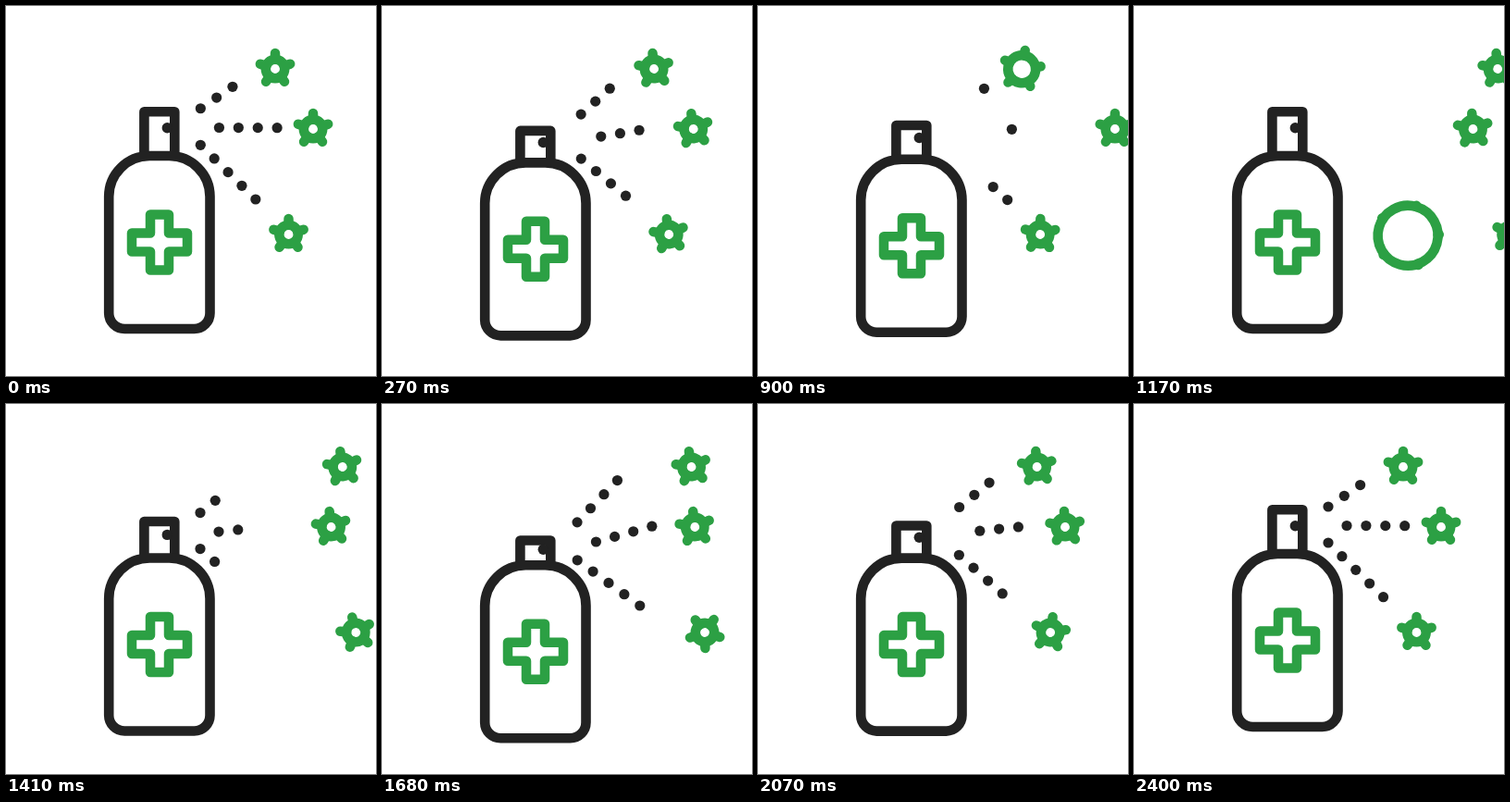
Animation, 400 px wide and 400 px high, one loop 2.43 s. Source, as an HTML page:

```html
<!DOCTYPE html>
<html lang="en">
<head>
<meta charset="utf-8">
<title>Disinfectant spray</title>
<style>
html, body { margin: 0; width: 100%; height: 100%; overflow: hidden; background: #fff; }
svg { display: block; width: 100vw; height: 100vh; }
.ink, .green { fill: none; stroke-linejoin: round; stroke-linecap: round; }
.ink { stroke: #222; stroke-width: 10.6; }
.green { stroke: #2ca044; stroke-width: 10.5; }
.dot { fill: #222; }
</style>
</head>
<body>
<svg viewBox="0 0 400 400">
  <path id="cap" class="ink"/>
  <circle id="nozzle" class="dot" cx="174.3" r="5.7"/>
  <g id="body">
    <path class="ink" d="M111.2 206A44 44 0 0 1 155.2 162H176.5A44 44 0 0 1 220.5 206V332A17 17 0 0 1 203.5 349H128.2A17 17 0 0 1 111.2 332Z"/>
    <path class="green" d="M156 225.5h20v20h20v20h-20v20h-20v-20h-20v-20h20z"/>
  </g>
  <g id="spray"></g>
  <g id="germs"></g>
</svg>
<script>
const LOOP = 2430, PRESS = 1215, GAP = 20.9, SIZE = 10.2, BURST = 240;
const $ = id => document.getElementById(id);
const make = (tag, parent, attrs) => {
  const el = document.createElementNS('http://www.w3.org/2000/svg', tag);
  for (const k in attrs) el.setAttribute(k, attrs[k]);
  return parent.appendChild(el);
};
const show = (el, on) => { el.style.display = on ? '' : 'none'; };
const span = (t, from, to) => Math.min(1, Math.max(0, (t - from) / (to - from)));
const smooth = u => u * u * (3 - 2 * u);

// Bottle press: the body sinks, the cap is squeezed into it, both come back.
const sink = p => 12.3 * smooth(span(p, 0, 480)) * (1 - span(p, 500, 1170)) ** 1.3;
const squeeze = p => 21 * smooth(span(p, 0, 460)) * (1 - span(p, 560, 1170) ** 1.27);

// Spray: the first puff is cut off from its start, the second grows to full length.
const jets = [
  [210, 111, 259, 77.8],
  [230, 131.5, 293.5, 131.7],
  [210, 150, 279.5, 218.5]
].map(line => ({
  line,
  dots: Array.from({ length: 6 }, () => make('circle', $('spray'), { class: 'dot', r: 5.6 }))
}));

function drawJet({ line: [x0, y0, x1, y1], dots }, t, low) {
  const y = y0 + 1.46 * low, len = Math.hypot(x1 - x0, y1 - y);
  const fading = t < 1200;
  const first = fading
    ? 0.419 * Math.sqrt(t) + len * span(t, 600, 1200)
    : GAP * span(t, 1500, 2400) ** 1.65 % GAP;
  const end = fading ? len : len * span(t, 1250, 1620);
  dots.forEach((dot, i) => {
    const d = first + i * GAP, u = d / len;
    dot.setAttribute('cx', x0 + (x1 - x0) * u);
    dot.setAttribute('cy', y + (y1 - y) * u);
    show(dot, d < end);
  });
}

// Each germ is pushed by the spray and bursts; a fresh one slows down into its place.
function germShape() {
  const g = make('g', $('germs'), {});
  return { g, ring: make('circle', g, { class: 'green' }), arms: make('path', g, { class: 'green' }) };
}
const germs = [
  { x: 291, y: 68, burst: 860, push: 0.019, rest: 2300, speed: 86, roll: 0, sway: 9 },
  { x: 332, y: 133, burst: 530, push: 0.025, rest: 1900, speed: 54, roll: 0, sway: 7 },
  { x: 305.5, y: 247, burst: 980, push: 0.025, rest: 2300, speed: 86, roll: 0.8, sway: 0 }
].map(g => ({ ...g, old: germShape(), fresh: germShape() }));

function drawShape({ g, ring, arms }, x, y, turn, r) {
  const tip = 17 + 0.75 * (r - SIZE);
  let d = '';
  for (let i = 0; i < 5; i++) {
    const a = i * Math.PI * 0.4, s = Math.sin(a), c = -Math.cos(a);
    d += `M${r * s} ${r * c}L${tip * s} ${tip * c}`;
  }
  g.setAttribute('transform', `translate(${x} ${y}) rotate(${turn})`);
  ring.setAttribute('r', r);
  arms.setAttribute('d', d);
}

function drawGerm(g, t) {
  const q = span(t, g.burst, g.burst + BURST);
  const drift = g.push * t - 2.82e-5 * t * t;
  drawShape(g.old, g.x + drift, g.y + 1.5 * q, -1.7 * drift, SIZE + 28 * q);
  show(g.old.g, q < 1);

  const away = g.speed * (Math.max(0, g.rest - t) / 1000) ** 1.42;
  const sway = g.sway * Math.sin(Math.PI * span(t, 900, 2300));
  drawShape(g.fresh, g.x + away, g.y, g.roll * away - sway, SIZE);
}

function draw(t) {
  const p = t % PRESS, low = sink(p);
  const base = 162 + low, top = 114.3 + low + squeeze(p);
  $('body').setAttribute('transform', `translate(0 ${low})`);
  $('cap').setAttribute('d', `M149.4 ${base}V${top}H182.3V${base}`);
  $('nozzle').setAttribute('cy', base - (base - top) * 0.635);
  jets.forEach(j => drawJet(j, t, low));
  germs.forEach(g => drawGerm(g, t));
}

const start = performance.now();
function tick() {
  draw((performance.now() - start) % LOOP);
  requestAnimationFrame(tick);
}
tick();
</script>
</body>
</html>
```
